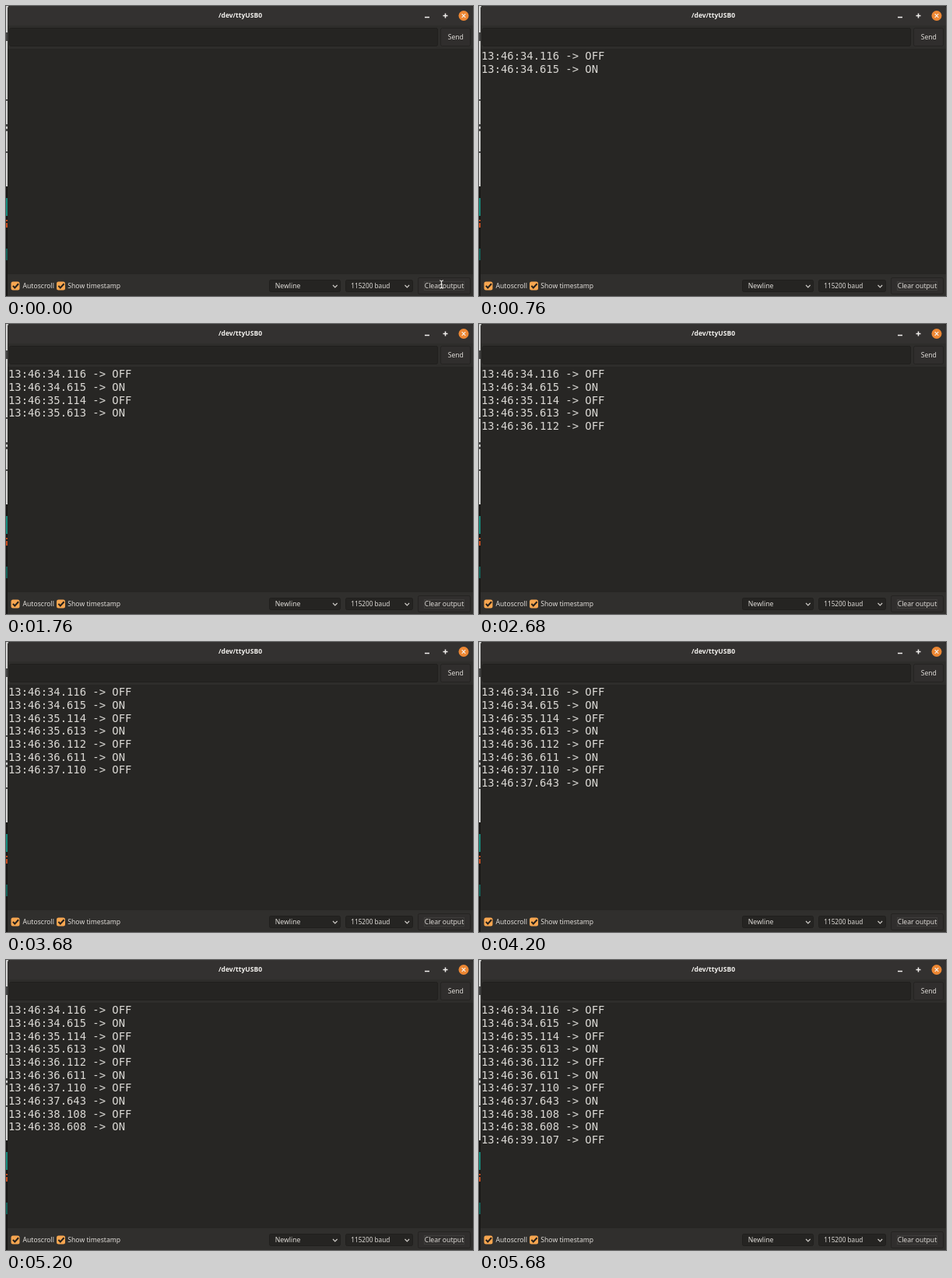
Animation, 600 px wide and 373 px high, one loop 6.2 s. Source, as an HTML page:

```html
<!DOCTYPE html>
<html lang="en">
<head>
<meta charset="utf-8">
<title>Serial monitor</title>
<style>
  html, body { margin: 0; width: 100%; height: 100%; overflow: hidden; background: #272624; }
  svg { display: block; width: 600px; height: 373px; }
  .ui { font: 8.65px "Noto Sans", "Open Sans", sans-serif; fill: #dedbd7; }
  .title { font-weight: bold; font-size: 8.5px; fill: #f2f0ed; }
  #log { font: 13.85px "DejaVu Sans Mono", monospace; fill: #dad8d4; white-space: pre; }
  .field { fill: #252422; stroke: #201f1d; }
  .button { fill: #302e2d; stroke: #242321; }
  .icon { fill: none; stroke: #f2f0ed; stroke-width: 1.5; }
  .arrow { fill: none; stroke: #cfccc8; stroke-width: 1.2; }
</style>
</head>
<body>
<svg viewBox="0 0 600 373">
  <defs>
    <g id="check">
      <rect width="11" height="11" rx="2.5" fill="#f7a650"/>
      <path d="M2.4 5.4 4.8 8 9.6 2.8" fill="none" stroke="#26211c" stroke-width="2"/>
    </g>
  </defs>

  <!-- Sliver of the desktop behind the window -->
  <rect width="3" height="373" fill="#171615"/>
  <rect width="3" height="232" fill="#d2d2d1"/>
  <path d="M0 34h2v11h-2zM0 120h2v2h-2zM0 152h2v3h-2zM0 158h2v3h-2zM0 187h2v2h-2z" fill="#444"/>
  <rect y="247" width="3" height="23" fill="#15887b"/>
  <path d="M0 275h2v2h-2zM0 279h2v6h-2z" fill="#c4491c"/>
  <rect y="312" width="3" height="15" fill="#115f55"/>

  <!-- Window -->
  <path d="M2 373V4q0-4 4-4H596q4 0 4 4V373z" fill="#272624"/>
  <path d="M2 25V4q0-4 4-4H596q4 0 4 4V25z" fill="#333130"/>
  <rect x="2" y="25" width="598" height="30" fill="#2e2d2b"/>
  <rect x="2" y="345" width="598" height="28" fill="#302f2d"/>

  <text class="ui title" x="301" y="15.3" text-anchor="middle">/dev/ttyUSB0</text>
  <path class="icon" d="M538 14.5h6M561.5 12.5h6M564.5 9.5v6"/>
  <circle cx="588" cy="12.5" r="6.5" fill="#ed8733"/>
  <path class="icon" d="M585.7 10.2l4.6 4.6m0-4.6l-4.6 4.6" style="stroke-width:1.2"/>

  <rect class="field" x="4.5" y="28.5" width="550" height="23" rx="2"/>
  <rect class="button" x="558.5" y="28.5" width="38" height="23" rx="2"/>
  <text class="ui" x="567.7" y="43.2">Send</text>

  <use href="#check" x="6.5" y="354.5"/>
  <text class="ui" x="21.5" y="363.2">Autoscroll</text>
  <use href="#check" x="65" y="354.5"/>
  <text class="ui" x="79.3" y="363.2">Show timestamp</text>

  <rect class="field" x="338.5" y="352.5" width="91" height="15" rx="2"/>
  <text class="ui" x="345.7" y="363.2">Newline</text>
  <path class="arrow" d="M420 359l2.8 2.8 2.8-2.8"/>
  <rect class="field" x="436.5" y="352.5" width="86" height="15" rx="2"/>
  <text class="ui" x="443.3" y="363.2" style="font-size:8.2px">115200 baud</text>
  <path class="arrow" d="M512.5 359l2.8 2.8 2.8-2.8"/>

  <rect class="button" x="529.5" y="349.5" width="67" height="21" rx="2"/>
  <rect x="537.5" y="354.5" width="51" height="11" fill="none" stroke="#5b5956" stroke-width=".7" stroke-dasharray="1 1"/>
  <text class="ui" x="537.7" y="363.2">Clear output</text>

  <g id="log"></g>
  <path id="pointer" d="M557 353q2.5 0 2.5 2v6q0 2-2.5 2M562 353q-2.5 0-2.5 2M562 363q-2.5 0-2.5-2M558 358h3"
        fill="none" stroke="#eceae6" stroke-width="1.2"/>
</svg>
<script>
const LOOP = 6200;
const POINTER_HIDES = 40;
// Moment each line arrives, and its printed seconds
const entries = [
  [200, "34.116"], [760, "34.615"], [1400, "35.114"], [1760, "35.613"],
  [2680, "36.112"], [3200, "36.611"], [3680, "37.110"], [4200, "37.643"],
  [4680, "38.108"], [5200, "38.608"], [5680, "39.107"]
];
const log = document.getElementById("log");
const pointer = document.getElementById("pointer");

const lines = entries.map(([at, seconds], i) => {
  const node = document.createElementNS("http://www.w3.org/2000/svg", "text");
  node.setAttribute("x", 3);
  node.setAttribute("y", 69.1 + i * 16.7);
  node.textContent = `13:46:${seconds} -> ${i % 2 ? "ON" : "OFF"}`;
  log.append(node);
  return { at, node };
});

const show = (node, visible) => node.setAttribute("visibility", visible ? "visible" : "hidden");

function draw(now) {
  const t = now % LOOP;
  show(pointer, t < POINTER_HIDES);
  for (const { at, node } of lines) show(node, t >= at);
  requestAnimationFrame(() => draw(performance.now() - start));
}

const start = performance.now();
draw(0);
</script>
</body>
</html>
```
